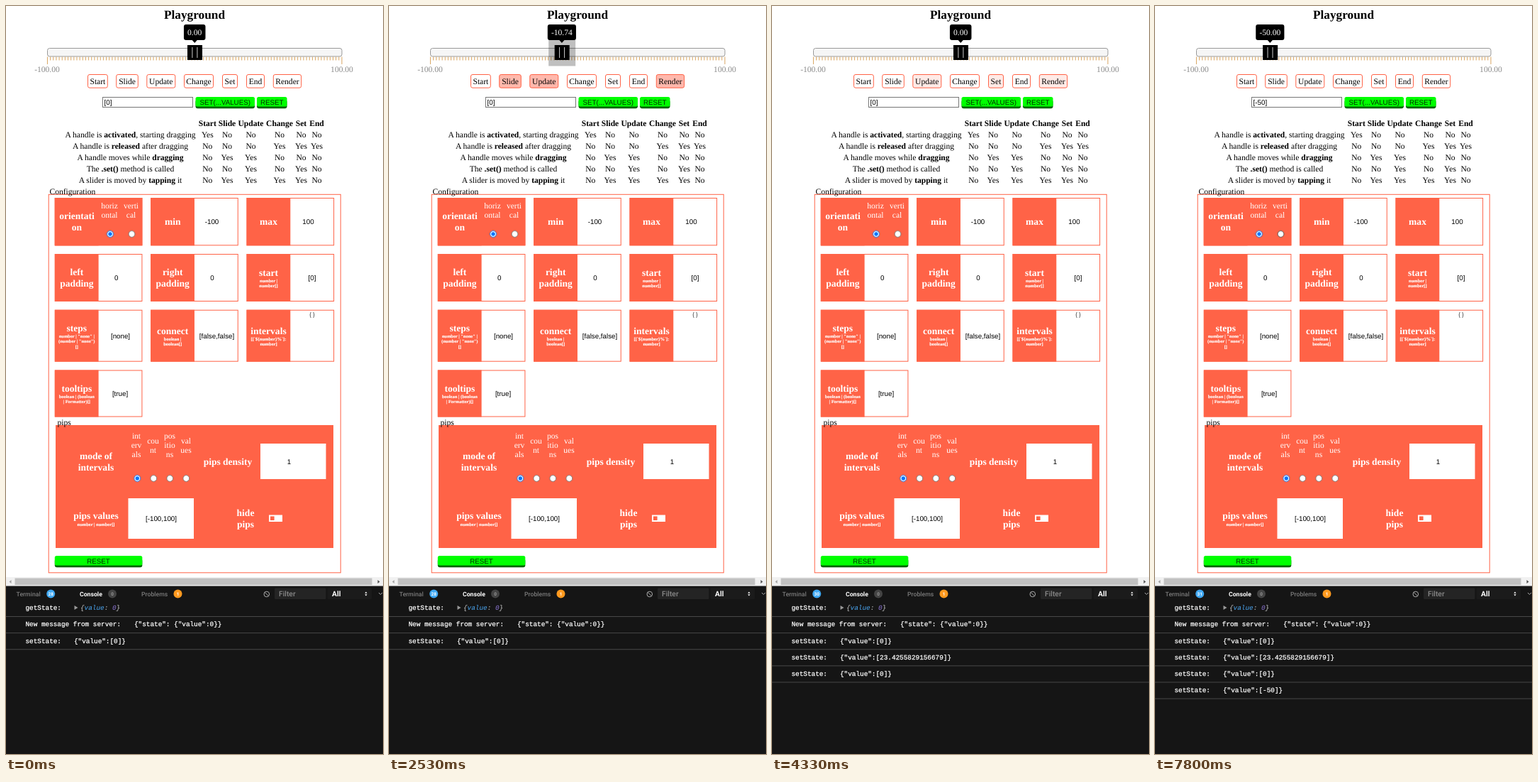
Write an HTML page that moves like this. It is 532x1053 px and loops after 8 s.

```html
<!DOCTYPE html>
<html lang="en">
<head>
<meta charset="utf-8">
<title>Slider playground</title>
<style>
  html, body { margin: 0; width: 100%; height: 100%; overflow: hidden; background: #fff; }
  svg { display: block; width: 532px; height: 1053px; }
  text { white-space: pre; text-rendering: geometricPrecision; font: 11.56px "Liberation Serif", serif; }
  .mid { text-anchor: middle; }
  .b { font-weight: 700; }
  .w { fill: #fff; }
  .title { font-size: 17.3px; font-weight: 700; }
  .head { font-size: 13.53px; font-weight: 700; fill: #fff; }
  .hint { font-size: 6.5px; font-weight: 700; fill: #fff; stroke: #fff; stroke-width: .15px; }
  .field { font: 9.75px "Liberation Sans", sans-serif; }
  .tiny { font: 8px "Liberation Sans", sans-serif; fill: #333; }
  .pip { fill: #888; }
  .tab { font: 500 8.7px Roboto, sans-serif; fill: #7c7c7c; }
  .tool { font: 500 10.3px Roboto, sans-serif; fill: #8a8a8a; }
  .on { font-weight: 700; fill: #fff; }
  .badge { font: 700 6.4px Roboto, sans-serif; fill: #fff; }
  .log { font: 9.35px "Liberation Mono", monospace; fill: #fff; }
  .strong { stroke: #fff; stroke-width: .25px; }
</style>
</head>
<body>
<svg id="stage" viewBox="0 0 532 1053"></svg>
<script>
const TOMATO = '#ff6347', LOOP = 8000, STEP = 200 / 3, FADE = 530;
const stage = document.getElementById('stage');

function add(tag, attrs, parent = stage) {
  const node = document.createElementNS('http://www.w3.org/2000/svg', tag);
  set(node, attrs);
  return parent.appendChild(node);
}
function set(node, attrs) {
  for (const key in attrs) node.setAttribute(key, attrs[key]);
}
function rect(x, y, width, height, fill, more = {}, parent) {
  return add('rect', { x, y, width, height, fill, ...more }, parent);
}
function frame(x, y, w, h, stroke, more = {}, parent) {
  return rect(x + .5, y + .5, w - 1, h - 1, 'none', { stroke, ...more }, parent);
}
function circle(cx, cy, r, fill, more = {}) {
  return add('circle', { cx, cy, r, fill, ...more });
}
function path(d, more, parent) {
  return add('path', { d, fill: 'none', ...more }, parent);
}
// Parts between asterisks are bold.
function text(x, y, str, cls = '', parent) {
  const node = add('text', { x, y, class: cls }, parent);
  str.split('*').forEach((part, i) => {
    if (part) add('tspan', i % 2 ? { class: 'b' } : {}, node).textContent = part;
  });
  return node;
}
function lines(x, y, gap, rows, cls) {
  rows.forEach((row, i) => text(x, y + i * gap, row, cls + ' mid'));
}
function show(node, on) {
  node.style.display = on ? '' : 'none';
}

text(266, 17.5, 'Playground', 'title mid');

// Slider track and scale
const toX = v => 266.2 + v * 2.0775;
rect(58.5, 59.5, 415.5, 11.5, '#f6f6f6', { rx: 3, stroke: '#999' });
for (let v = -100; v <= 100; v += 2) {
  const end = Math.abs(v) === 100;
  path(`M${toX(v)} 71.5V${end ? 82 : 76.5}`, { stroke: '#d8a560' });
}
text(58, 93, '-100.00', 'pip mid');
text(474, 93, '100.00', 'pip mid');

const knob = add('g', {});
const halo = rect(0, 0, 0, 0, '#000', { opacity: .25 }, knob);
rect(-10.2, 55, 21, 21, '#000', {}, knob);
path('M-3.3 58V73M3.7 58V73', { stroke: '#ccc' }, knob);
const tip = rect(0, 26, 0, 22, '#000', { rx: 3 }, knob);
path('M-4 47.5H4L0 52Z', { fill: '#000' }, knob);
const tipText = add('text', { x: 0, y: 41, class: 'w mid' }, knob);

// Event lamps
const lamps = [['Start', 115, 28.8], ['Slide', 155.2, 31.6], ['Update', 198.3, 41], ['Change', 251, 42],
  ['Set', 305, 22], ['End', 339, 26], ['Render', 376.8, 40.3]].map(([name, x, w]) => {
  const box = frame(x, 96, w, 19.7, TOMATO, { rx: 2.5 });
  text(x + w / 2, 110, name, 'mid');
  return { name, box };
});
const fired = {
  Start: [1400], Change: [3000], End: [3000], Set: [3000, 3930, 7000],
  Update: [3930, 7000], Render: [3000, 3930, 7000]
};
const dragged = ['Slide', 'Update', 'Render'];

// Value input
const input = rect(0, 0, 0, 0, '#fff');
const inputText = text(138.6, 139, '', 'field');
const caret = rect(141, 130, 1, 11, '#000');

function button(x, y, w, label) {
  const g = add('g', {});
  rect(x, y + 4, w, 12.2, '#006400', { rx: 3 }, g);
  const cap = add('g', {}, g);
  rect(x, y, w, 13.5, '#0f0', { rx: 2.5 }, cap);
  text(x + w / 2, y + 10.5, label, 'field mid', cap).setAttribute('fill', '#032803');
  return cap;
}
const setCap = button(267.5, 128, 83.5, 'SET(...VALUES)');
const resetCap = button(354, 128, 42.5, 'RESET');

// Event table
const cols = [284.3, 312, 345.5, 386, 416.5, 438.5];
['Start', 'Slide', 'Update', 'Change', 'Set', 'End'].forEach((s, i) => text(cols[i], 168.5, s, 'b mid'));
[['A handle is *activated*, starting dragging', '100000'],
  ['A handle is *released* after dragging', '000111'],
  ['A handle moves while *dragging*', '011000'],
  ['The *.set()* method is called', '001010'],
  ['A slider is moved by *tapping* it', '011110']].forEach(([label, flags], r) => {
  const y = 185 + r * 15.9;
  text(175.5, y, label, 'mid');
  [...flags].forEach((f, i) => text(cols[i], y, f === '1' ? 'Yes' : 'No', 'mid'));
});

// Configuration panel
frame(59.7, 264.8, 413, 533.5, TOMATO);
text(61.5, 264.5, 'Configuration');

const colX = i => 68.8 + i * 135.35;
function cell(col, y, h, heads, headY, hints = [], hintY = 0, value = '', valueX = 0, valueY = 0) {
  const x = colX(col);
  rect(x, y, 61.8, h, TOMATO);
  frame(x, y, 123.6, h, TOMATO);
  lines(x + 31, headY, 15.7, heads, 'head');
  lines(x + 31, hintY, 7.4, hints, 'hint');
  text(valueX, valueY, value, 'field mid');
}
function radio(x, y, on) {
  const ring = circle(x, y, 4.4, '#fff', { stroke: on ? '#0075ff' : '#767676', 'stroke-width': .9 });
  if (on) circle(x, y, 2.7, '#0075ff');
  return ring;
}
cell(0, 270, 67.3, ['orientati', 'on'], 300);
rect(colX(0), 270, 123.6, 67.3, TOMATO);
lines(100, 300, 15.7, ['orientati', 'on'], 'head');
lines(146, 285, 13, ['horiz', 'ontal'], 'w');
lines(176.5, 285, 13, ['verti', 'cal'], 'w');
radio(147, 321, true);
const vertical = radio(177.5, 321);
cell(1, 270, 67.3, ['min'], 308, [], 0, '-100', 290.5, 307);
cell(2, 270, 67.3, ['max'], 308, [], 0, '100', 426.5, 307);
cell(0, 349, 67, ['left', 'padding'], 379, [], 0, '0', 155.7, 386.3);
cell(1, 349, 67, ['right', 'padding'], 379, [], 0, '0', 291, 386.3);
cell(2, 349, 67, ['start'], 380, ['number |', 'number[]'], 389, '[0]', 432, 386.3);
cell(0, 427.7, 73, ['steps'], 458, ['number | "none" |', '(number | "none")', '[]'], 467, '[none]', 161.5, 467.5);
cell(1, 427.7, 73, ['connect'], 462, ['boolean |', 'boolean[]'], 471, '[false,false]', 297.5, 467.5);
cell(2, 427.7, 73, ['intervals'], 462, ['[[`${number}%`]:', 'number]'], 471);
text(432, 436.5, '{ }', 'tiny mid');
cell(0, 512.5, 66, ['tooltips'], 543, ['boolean | (boolean', '| Formatter)[]'], 552, '[true]', 161, 549);

// Pips panel
rect(70, 590, 392, 173, TOMATO);
text(72.5, 590, 'pips');
lines(127, 638, 15.7, ['mode of', 'intervals'], 'head');
[[184, 609, ['int', 'erv', 'als']], [207.5, 616, ['cou', 'nt']],
  [231, 609, ['pos', 'itio', 'ns']], [254, 616, ['val', 'ues']]].forEach(([x, y, rows], i) => {
  lines(x, y, 13, rows, 'w');
  radio(185.3 + i * 23, 665, i === 0);
});
lines(313, 646, 0, ['pips density'], 'head');
rect(359, 616, 92.5, 50, '#fff');
text(399.5, 644.7, '1', 'field mid');
lines(127, 722, 0, ['pips values'], 'head');
lines(127, 731.5, 0, ['number | number[]'], 'hint');
rect(172.5, 693, 92.5, 57, '#fff');
text(219, 725, '[-100,100]', 'field mid');
lines(338, 718, 15.7, ['hide', 'pips'], 'head');
rect(371, 716.5, 19, 9.5, '#fff');
rect(373, 718.4, 5.6, 5.6, TOMATO);
button(68.8, 774, 123.5, 'RESET');

// Scrollbar
rect(0, 804, 532, 12.5, '#f1f1f1');
rect(12.5, 805.5, 504, 9.5, '#c1c1c1');
path('M7.5 808V813L4.5 810.5Z', { fill: '#a3a3a3' });
path('M524.5 808V813L527.5 810.5Z', { fill: '#505050' });

// Console
rect(0, 816.5, 532, 236.5, '#151515');
text(14.5, 830.5, 'Terminal', 'tab');
text(104, 830.5, 'Console', 'tab on');
text(191, 830.5, 'Problems', 'tab');
function badge(x, fill, label) {
  circle(x, 827.5, 6, fill);
  return text(x, 829.8, label, 'badge mid');
}
const count = badge(63.2, '#40a9f3', '28');
badge(150, '#444', '0').style.fill = '#999';
badge(242.5, '#ff9a1f', '1');
circle(367.8, 828, 3.8, 'none', { stroke: '#aaa' });
path('M365.2 825.4L370.4 830.6', { stroke: '#aaa' });
rect(379, 819.5, 72.5, 15.5, '#242424', { rx: 1.5 });
text(385, 831, 'Filter', 'tool');
rect(453.5, 819.5, 62.5, 15.5, '#1b1b1b', { rx: 1.5 });
text(460, 831, 'All', 'tool on');
path('M506.3 826.8L508 824.5L509.7 826.8ZM506.3 828.2L508 830.5L509.7 828.2Z', { fill: '#fff' });
path('M526 826L528.5 828.5L531 826', { stroke: '#aaa' });

function log(row, label, x, body) {
  const g = add('g', {}), y = 850.3 + row * 23.12;
  text(27.5, y, label, 'log strong', g);
  text(x, y, body, 'log strong', g);
  rect(0, 859 + row * 23.12, 532, 1, '#484848', {}, g);
  return g;
}
log(0, 'getState:', 0, '');
path('M96.5 844V850L101.5 847Z', { fill: '#999' });
const preview = add('text', { x: 105, y: 850.3, class: 'log' });
preview.style.fontStyle = 'italic';
[['{', '#ccc'], ['value', '#4aa5f0'], [': ', '#ccc'], ['0', '#8f78d8'], ['}', '#ccc']].forEach(([s, fill]) => {
  add('tspan', { fill }, preview).textContent = s;
});
log(1, 'New message from server:', 181, '{"state": {"value":0}}');
const logs = ['[0]', '[23.4255829156679]', '[0]', '[-50]']
  .map((v, i) => log(i + 2, 'setState:', 96, `{"value":${v}}`));
const logTimes = [0, 3070, 4000, 7070];

// Timeline
const dragKeys = [[1400, 0], [1800, 96.51], [1870, 100], [1930, 100], [2200, -100],
  [2330, -100], [2530, -10.74], [2800, 23.43]];
const haloKeys = [[1000, 10.5], [1200, 16], [1330, 16], [1530, 19], [3870, 19], [4070, 10.5]];
const typed = [[0, '[0]'], [3000, '[23.4255829156679]'], [3930, '[0]'], [5670, '[-0]'], [5930, '[-50]']];
const blinks = [4800, 5070, 5330, 5600, 5670, 6130, 6400, 6600, 6870, 6930];

const smooth = p => p * p * (3 - 2 * p);
const linear = p => p;
function tween(keys, t, ease) {
  const i = keys.findIndex(k => k[0] > t);
  if (i === 0) return keys[0][1];
  if (i < 0) return keys[keys.length - 1][1];
  const [t0, a] = keys[i - 1], [t1, b] = keys[i];
  return a + (b - a) * ease((t - t0) / (t1 - t0));
}
function valueAt(t) {
  if (t >= 7000) return -50;
  return t >= 3930 ? 0 : tween(dragKeys, t, smooth);
}
function glow(name, t) {
  const levels = (fired[name] || []).map(e => t < e ? 0 : .55 * (1 - (t - e) / FADE));
  if (dragged.includes(name) && t >= 1470) levels.push(.45 * (1 - Math.max(0, t - 2800) / FADE));
  return Math.max(0, ...levels);
}
function press(cap, on) {
  cap.setAttribute('transform', `translate(0 ${on ? 1.5 : 0})`);
}

function draw(t) {
  const v = valueAt(t), label = v.toFixed(2);
  knob.setAttribute('transform', `translate(${toX(v)} 0)`);
  tipText.textContent = label;
  const digits = label.replace(/\D/g, '').length;
  const w = (digits * .5 + .25 + (v < 0 ? .333 : 0)) * 11.56 + 10.3;
  set(tip, { x: -w / 2, width: w });
  const r = tween(haloKeys, t, linear);
  set(halo, { x: .3 - r, y: 65.5 - r, width: 2 * r, height: 2 * r });

  lamps.forEach(({ name, box }) => box.setAttribute('fill', `rgba(255,99,71,${glow(name, t)})`));

  const focused = t >= 4800 && t < 6930, line = focused ? 1.7 : 1;
  set(input, {
    x: 136 + line / 2, y: 128 + line / 2, width: 128 - line, height: 15 - line,
    stroke: focused ? '#000' : '#767676', 'stroke-width': line, rx: focused ? 1.5 : 0
  });
  inputText.textContent = typed.filter(k => k[0] <= t).pop()[1];
  show(caret, blinks.filter(b => b <= t).length % 2 === 1);
  caret.setAttribute('x', t < 5670 ? 141 : t < 5930 ? 144 : 149);
  press(resetCap, t >= 3870 && t < 3930);
  press(setCap, t >= 6930 && t < 7000);

  logs.forEach((g, i) => show(g, t >= logTimes[i]));
  count.textContent = 27 + logTimes.filter((at, i) => t >= at + (i ? 60 : 0)).length;
  vertical.setAttribute('stroke', t >= 7800 ? '#4f4f4f' : '#767676');
}

// The picture advances at 15 steps a second, on times rounded to 10 ms.
function tick() {
  const t = performance.now() % LOOP;
  draw(Math.round(Math.floor((t + 4) / STEP) * STEP / 10) * 10 % LOOP);
  requestAnimationFrame(tick);
}
tick();
</script>
</body>
</html>
```
